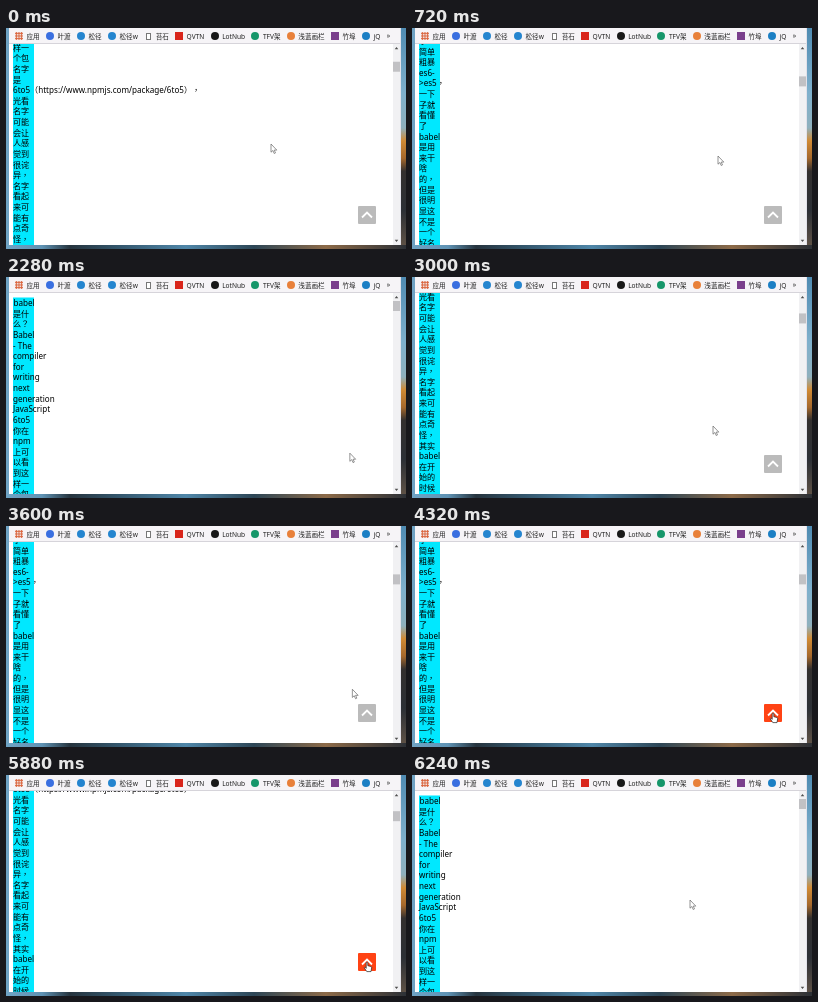
Recreate the animation shown at these times as an HTML page. Size 400 px wide and 221 px high, loop 6.36 s.

```html
<!DOCTYPE html>
<html lang="zh-CN">
<head>
<meta charset="utf-8">
<style>
html, body { margin: 0; width: 100%; height: 100%; overflow: hidden; }
#stage {
  position: relative; width: 400px; height: 221px; overflow: hidden;
  background: linear-gradient(90deg, #6fa3c4, #5f93b4 9%, #26343e 16%, #33566c 28%, #4f86a8 45%, #2d4656 62%, #8c6a48 80%, #2c3036);
  font-family: "Noto Sans", "Noto Sans CJK SC", "Noto Sans CJK", sans-serif;
}
#stage > *, #text, #thumb { position: absolute; }
#wall {
  right: 0; top: 0; width: 6px; height: 217px;
  background: linear-gradient(#4f8bb2, #7fb0cc 30%, #8fb0bd 46%, #d08a34 52%, #a5682c 60%, #33302f 66%, #2c3036 84%, #5d5146);
}
#window { left: 3px; top: 0; width: 391px; height: 217px; background: #fff; border-right: 1px solid #e2e2ea; }
#bar {
  left: 3px; top: 0; width: 385px; height: 15px; padding-left: 6px; background: #f6f4f7;
  border-bottom: 1px solid #d6d4da; display: flex; align-items: center;
  font-size: 6.6px; color: #222; white-space: nowrap;
}
#bar span { margin: 1px 6.3px 0 3.5px; }
#bar i { width: 8px; height: 8px; margin-top: 1px; box-sizing: border-box; flex: none; }
#bar .disc { border-radius: 50%; }
#bar .page { width: 5px; height: 7px; margin: 1px 1.5px 0; background: #fff; border: .7px solid #777; }
#bar .dots { background: radial-gradient(circle, #d9623a 1px, #0000 1.3px) 0 0 / 2.66px 2.66px; }
#view { left: 3px; top: 16px; width: 384px; height: 201px; overflow: hidden; }
#text {
  left: 4px; top: 4px; width: 20.5px; text-indent: .5px; background: #00e8ff;
  font-size: 8.1px; line-height: 10.63px; color: #000; white-space: pre; text-spacing-trim: space-all;
}
#text b { font-weight: 400; font-family: "Noto Sans CJK TC", "Noto Sans CJK", sans-serif; line-height: 0; }
#track { left: 387px; top: 16px; width: 7px; height: 201px; background: #f1f1f3; }
#thumb { left: 0; top: 8px; width: 7px; height: 10px; background: #c1c1c4; }
#top { left: 352px; top: 178px; width: 18px; height: 18px; border-radius: 1px; background: #bbb; }
#top.hot { background: #ff4314; }
#arrow, #hand { left: 0; top: 0; overflow: visible; fill: #fff; stroke-width: .7px; }
</style>
</head>
<body>
<div id="stage">
  <div id="wall"></div>
  <div id="window"></div>
  <div id="view"><div id="text"></div></div>
  <div id="track">
    <svg width="7" height="201" fill="#505050"><path d="M1.7 5.2h3.6l-1.8-2.2zM1.7 195.8h3.6l-1.8 2.2z"/></svg>
    <div id="thumb"></div>
  </div>
  <div id="top">
    <svg width="18" height="18" fill="none" stroke="#fff" stroke-width="1.8"><path d="M4 11.5l5-5 5 5"/></svg>
  </div>
  <div id="bar"></div>
  <svg id="arrow" width="8" height="12" stroke="#666"><path d="M0 0v8.2l1.9-1.7 1.3 3 1.3-.6-1.3-2.8h2.6z"/></svg>
  <svg id="hand" width="10" height="12" stroke="#222"><path d="M-.8.6Q0-.5.8.6v3.1l3.2.8q.8.3.7 1.2l-.7 3.9h-4.2l-2.6-3.8q.3-1 1.3-.2l.7.7z"/></svg>
</div>
<script>
const LOOP = 6360, STEP = 120, RISE = 480;
const $ = id => document.getElementById(id);
const clamp = p => Math.min(1, Math.max(0, p));
const mix = (a, b, p) => a + (b - a) * p;

const words = `babel 是什 么？ Babel -_The compiler for writing next generation JavaScript 6to5
你在 npm 上可 以看 到这 样一 个包 名字 是 6to5（https://www.npmjs.com/package/6to5），
光看 名字 可能 会让 人感 觉到 很诧 异， 名字 看起 来可 能有 点奇 怪，
其实 babel 在开 始的 时候 就是 这名 字， 简单 粗暴 es6- >es5， 一下 子就 看懂 了
babel 是用 来干 啥 的， 但是 很明 显这 不是 一个 好名 字， 这个 名字 会让 人感 觉到
es6 普及 之后 这个 库就 没用 了， 为了 保持 活力 这个 库可 能要 不停 的改 名字`;
// Centred full-width punctuation comes from the TC face
$("text").innerHTML = words.split(/\s+/).join("\n").replace("_", " ")
  .replace(">", "&gt;").replace(/[，？（）]/g, '<b lang="zh-TW">$&</b>');

const marks = [
  ["应用", "dots"], ["叶渡", "disc", "#3a6fe0"], ["松径", "disc", "#2585cf"], ["松径w", "disc", "#2585cf"],
  ["苔石", "page"], ["QVTN", "square", "#d9261c"], ["LotNub", "disc", "#181818"], ["TFV架", "disc", "#16966a"],
  ["浅蓝画栏", "disc", "#e8803a"], ["竹埠", "square", "#7a3f8c"], ["jQ", "disc", "#1c7fc4"]
];
$("bar").innerHTML = marks.map(([name, kind, color]) =>
  `<i class="${kind}" ${color ? `style="background:${color}"` : ""}></i><span>${name}</span>`).join("") + "»";

// Each round: wheel down from the top, move to the button, click, rise again
const button = { x: 361, y: 187 };
const rounds = [
  { x: 306, y: 128, top: -477, speed: .392, depth: 675, rest: 720, leave: 1320, click: 1740 },
  { x: 301, y: 149, top: 2750, speed: .957, depth: 469, rest: 2880, leave: 3360, click: 4320 },
  { x: 306, y: 185, top: 4790, speed: .957, depth: 469, rest: 5160, leave: 5280, click: 5640 },
  { x: 278, y: 125, rest: 6240, leave: LOOP, click: LOOP }
];

function scrollAt(t) {
  const r = rounds.findLast(r => r.top <= t);
  return t < r.click
    ? Math.min(r.depth, (t - r.top) * r.speed)
    : r.depth * (1 - clamp((t - r.click) / RISE));
}

function pointerAt(t) {
  const n = rounds.findIndex(r => t < r.click + 300), r = rounds[n];
  const from = n ? button : { x: 265, y: 116 };
  const begin = n ? rounds[n - 1].click + 300 : 0;
  if (t < r.leave) {
    const p = clamp((t - begin) / (r.rest - begin));
    return [mix(from.x, r.x, p), mix(from.y, r.y, p)];
  }
  const p = clamp((t - r.leave) / (r.click - r.leave) * 1.5);
  return [mix(r.x, button.x, 1 - (1 - p) ** 3), mix(r.y, button.y, p)];
}

const start = performance.now();
function draw() {
  const now = Math.max(0, performance.now() - start) % LOOP;
  const t = Math.floor(now / STEP) * STEP;
  const s = scrollAt(t), [x, y] = pointerAt(t), shown = s > 100;
  const hot = shown && x > 352 && x < 370 && y > 179 && y < 196;
  $("text").style.transform = `translateY(${.5 - s}px)`;
  $("thumb").style.transform = `translateY(${s * .052}px)`;
  $("top").style.visibility = shown ? "visible" : "hidden";
  $("top").classList.toggle("hot", hot);
  for (const id of ["arrow", "hand"]) {
    $(id).style.transform = `translate(${x}px,${y}px)`;
    $(id).style.display = (id === "hand") === hot ? "block" : "none";
  }
  requestAnimationFrame(draw);
}
draw();
</script>
</body>
</html>
```
